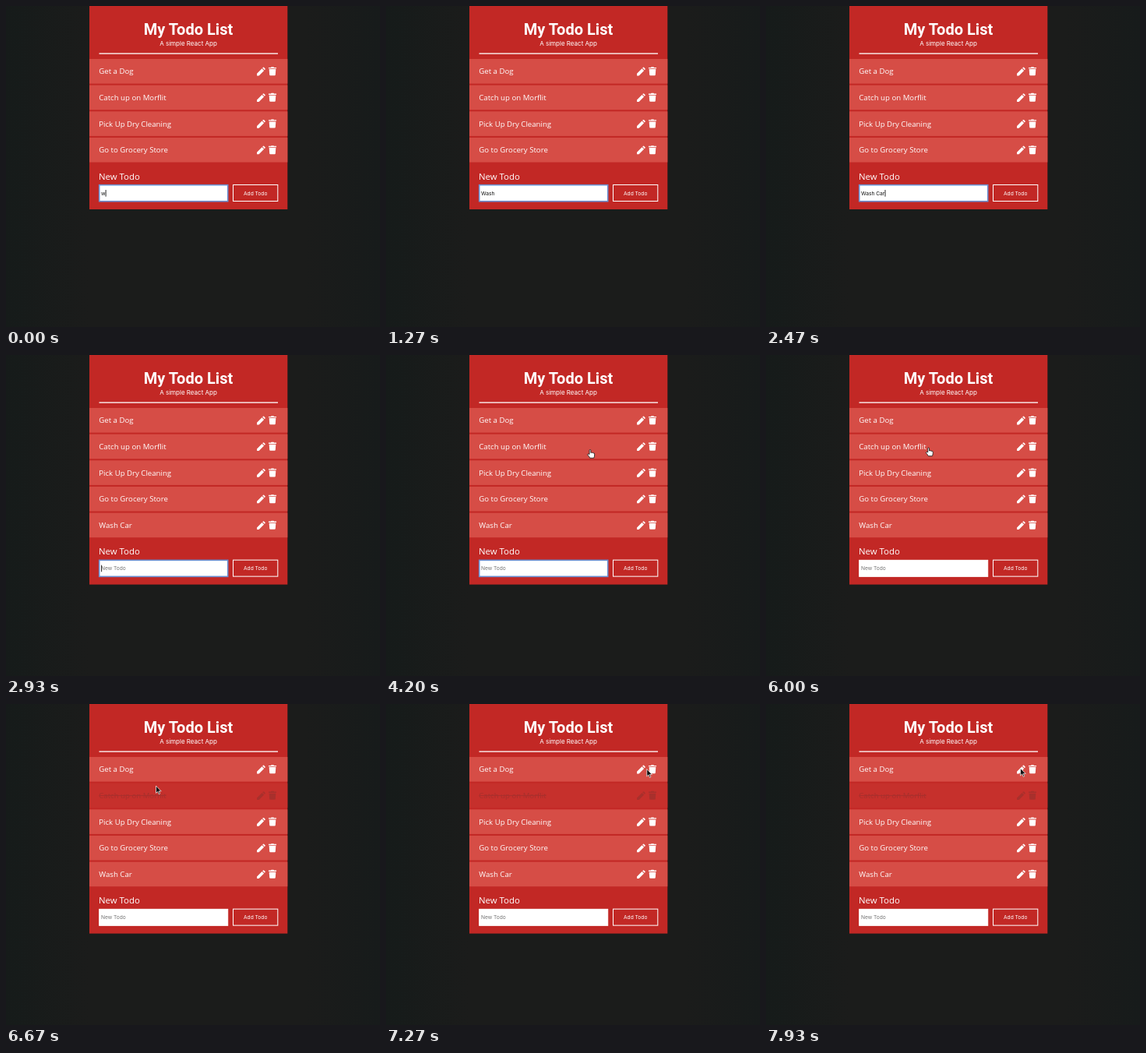
Write an HTML page that moves like this. It is 480 px wide and 412 px high and loops after 8000 ms.

```html
<!DOCTYPE html>
<html lang="en">
<head>
<meta charset="utf-8">
<title>My Todo List</title>
<style>
  html, body { margin: 0; width: 100%; height: 100%; overflow: hidden; background: #1b1c1b; }
  svg { display: block; width: 480px; height: 412px; }
  text { fill: #fff; white-space: pre; }
  .title { font: 700 20px Roboto, sans-serif; text-anchor: middle; }
  .subtitle { font: 8px Inter, sans-serif; text-anchor: middle; }
  .row text { font: 9.65px "Open Sans", sans-serif; }
  .row rect { fill: #d64d46; }
  .row use { fill: #fff; }
  .row.done rect { fill: #c6302c; }
  .row.done text { fill: #a8302c; text-decoration: line-through; }
  .row.done use { fill: #a8302c; }
  .label { font: 11.4px "Open Sans", sans-serif; }
  .small { font: 6.65px Inter, sans-serif; }
  #value { fill: #111; }
  #value.placeholder { fill: #757575; }
</style>
</head>
<body>
<svg viewBox="0 0 480 412">
  <defs>
    <linearGradient id="backdrop">
      <stop offset="0" stop-color="#161b1a"/>
      <stop offset=".22" stop-color="#1b1c1b"/>
      <stop offset=".8" stop-color="#1b1c1b"/>
      <stop offset="1" stop-color="#171b1b"/>
    </linearGradient>
    <path id="pencil" d="M0 11V8.4L6.5 1.9 9.1 4.5 2.6 11ZM7.2 1.2 8 .4Q8.5 0 9 .4L10.6 2Q11 2.5 10.6 3L9.8 3.8Z"/>
    <path id="trash" d="M0 .7H3L3.5 0H6.5L7 .7H10V2.1H0ZM.7 2.9H9.3L8.8 10Q8.7 11 7.8 11H2.2Q1.3 11 1.2 10Z"/>
  </defs>
  <rect width="480" height="412" fill="url(#backdrop)"/>
  <rect id="card" x="107" width="254.3" fill="#c22825"/>
  <text class="title" x="234" y="37">My Todo List</text>
  <text class="subtitle" x="234" y="50.6">A simple React App</text>
  <rect x="119.5" y="60.4" width="229.5" height="1.3" fill="#fff"/>
  <g id="list"></g>
  <g id="form">
    <text class="label" x="119" y="222.7">New Todo</text>
    <rect id="field" x="119.7" y="229.7" width="165" height="21" fill="#fff"/>
    <text id="value" class="small" x="122" y="242.6"></text>
    <rect id="caret" y="236" width=".9" height="8.6" fill="#111"/>
    <rect x="291.5" y="229.5" width="57.3" height="21" fill="none" stroke="#fff"/>
    <text class="small" x="320.2" y="242.6" text-anchor="middle">Add Todo</text>
  </g>
  <g id="cursor" stroke-linejoin="round">
    <path id="arrow" d="M0 0V9.4L2.2 7.4 3.7 10.8 5.2 10.1 3.7 6.9H6.7Z" fill="#111" stroke="#fff" stroke-width=".7"/>
    <path id="hand" d="M-.9 6V1Q-.9 0 0 0T.9 1V4Q1.8 3.2 2.5 4.1 3.4 3.5 4.1 4.4 5.6 4.1 5.6 5.6V7.5Q5.5 9 4.7 10.7H-.3Q-1 9-3 6.9-3.6 6-2.8 5.5-2 5.2-.9 6Z" fill="#fff" stroke="#111" stroke-width=".8"/>
  </g>
</svg>
<script>
const LOOP = 8000, PITCH = 33.65;
const ADDED = 2930, BLURRED = 5820, DONE = 6270;
const todos = ["Get a Dog", "Catch up on Morflit", "Pick Up Dry Cleaning", "Go to Grocery Store", "Wash Car"];
const typing = [[0, "w"], [70, ""], [130, "W"], [270, "Wa"], [370, "Was"], [470, "Wash"],
  [670, "Wash "], [2070, "Wash C"], [2270, "Wash Ca"], [2470, "Wash Car"], [ADDED, ""]];
const caretOff = [[1270, 1870], [3600, 4210], [4730, 5340], [BLURRED, LOOP]];
// time, x, y of the pointer tip
const route = [[3470, 323, -8], [3600, 321, 3], [3800, 321, 3], [4200, 262, 121.5], [4600, 322, 118],
  [4730, 324, 117], [4930, 324, 117], [5330, 161, 120.5], [5800, 284, 121], [6130, 170, 118],
  [6530, 170, 118], [6670, 192.5, 105], [7330, 338, 83], [7400, 338, 83], [7650, 342, 84], [7930, 326.5, 82.5]];

const $ = id => document.getElementById(id);
const show = (el, on) => el.setAttribute("visibility", on ? "visible" : "hidden");

$("list").innerHTML = todos.map((todo, i) => `
  <g class="row" transform="translate(107 ${68 + i * PITCH})">
    <rect width="254.3" height="31.6"/>
    <text x="12.3" y="19.3">${todo}</text>
    <use href="#pencil" x="215" y="10.4"/>
    <use href="#trash" x="230" y="10.2"/>
  </g>`).join("");
const rows = $("list").children;

function pointerAt(t) {
  const next = route.findIndex(p => p[0] > t);
  if (next < 0) return route.at(-1).slice(1);
  const [t0, x0, y0] = route[Math.max(0, next - 1)], [t1, x1, y1] = route[next];
  const u = Math.max(0, (t - t0) / (t1 - t0 || 1)), k = u * u * (3 - 2 * u);
  return [x0 + (x1 - x0) * k, y0 + (y1 - y0) * k];
}

function draw(t) {
  const added = t >= ADDED, focused = t < BLURRED;
  show(rows[4], added);
  rows[1].classList.toggle("done", t >= DONE);
  $("card").setAttribute("height", added ? 294.6 : 261);
  $("form").setAttribute("transform", `translate(0 ${added ? PITCH : 0})`);

  const typed = typing.findLast(step => step[0] <= t)[1];
  const value = $("value");
  value.textContent = typed;
  $("caret").setAttribute("x", 122.2 + (typed ? value.getComputedTextLength() : 0));
  show($("caret"), !caretOff.some(([from, to]) => t >= from && t < to));
  if (!typed) value.textContent = "New Todo";
  value.classList.toggle("placeholder", !typed);
  $("field").setAttribute("stroke", focused ? "#6a8fd0" : "#fff");
  $("field").setAttribute("stroke-width", focused ? 1.6 : 1);

  const hand = t > 4000 && t < 6530;
  show($("arrow"), t >= 3470 && !hand);
  show($("hand"), hand);
  $("cursor").setAttribute("transform", `translate(${pointerAt(t)})`);
}

function tick() {
  draw(performance.now() % LOOP);
  requestAnimationFrame(tick);
}
tick();
</script>
</body>
</html>
```
